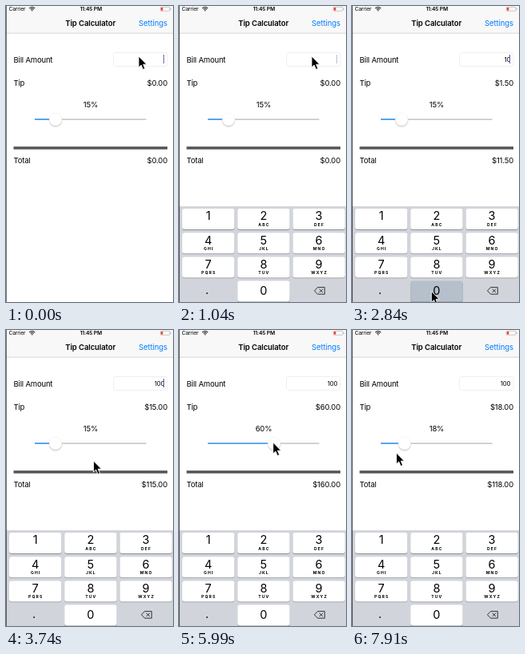
Write an HTML page that moves like this. It is 209 px wide and 371 px high and loops after 8 s.

```html
<!DOCTYPE html>
<html lang="en">
<head>
<meta charset="utf-8">
<title>Tip Calculator</title>
<style>
  html, body { margin: 0; width: 100%; height: 100%; overflow: hidden; background: #fff; }
  svg { display: block; width: 209px; height: 371px; font: 9.47px Inter, sans-serif; letter-spacing: -.017em; }
  .end { text-anchor: end; }
  .mid { text-anchor: middle; }
  .bold { font-weight: 600; }
  .title { letter-spacing: -.008em; }
  .status { font-size: 6.7px; }
  .digit { font-size: 14.5px; letter-spacing: 0; }
  .letters { font-size: 5.1px; font-weight: 700; letter-spacing: 1.1px; }
</style>
</head>
<body>
<svg viewBox="0 0 209 371">
  <rect width="209" height="34" fill="#f8f8f8"/>
  <path d="M0 34.2H209" stroke="#bcbcbe" stroke-width=".6"/>
  <text class="status" x="3.5" y="6.3">Carrier</text>
  <g fill="none" stroke="#000" stroke-width="1.1">
    <path d="M29.2 2.9a5 5 0 0 1 7 0M30.7 4.4a3 3 0 0 1 4 0"/>
    <circle cx="32.7" cy="5.7" r=".7" fill="#000" stroke="none"/>
  </g>
  <text class="status bold mid" x="106.3" y="6.3">11:45 PM</text>
  <rect x="193.2" y="1.3" width="11.8" height="5" rx="1" fill="none" stroke="#aaa" stroke-width=".6"/>
  <path d="M206 2.9v1.9" stroke="#aaa"/>
  <rect x="193.8" y="2" width="2.5" height="3.6" fill="#ff3b30"/>

  <text class="title bold mid" x="105.7" y="25">Tip Calculator</text>
  <text class="title end" x="202" y="25" fill="#007aff">Settings</text>
  <text x="9.5" y="71">Bill Amount</text>
  <text x="9.5" y="99.5">Tip</text>
  <text x="9.5" y="196.5">Total</text>
  <rect x="134.5" y="58.5" width="67.5" height="17" rx="3" fill="#fff" stroke="#ebebee" stroke-width=".8"/>
  <text id="bill" class="end" x="198.2" y="70" font-size="7.8"></text>
  <rect id="caret" x="197" y="61" width="1" height="11" fill="#5a55a8"/>
  <text id="tip" class="end" x="202" y="99.5"></text>
  <text id="percent" class="mid" x="106" y="127"></text>
  <text id="total" class="end" x="202" y="196.5"></text>

  <path d="M36 142.1H175.5" stroke="#b7b7b7" stroke-width="1.3"/>
  <path id="filled" stroke="#1e90ff" stroke-width="1.4"/>
  <g id="thumb">
    <circle cy="1.8" r="8.6" fill="#000" opacity=".06"/>
    <circle cy="1" r="8.3" fill="#000" opacity=".12"/>
    <circle r="8" fill="#fff" stroke="#e2e2e2" stroke-width=".3"/>
  </g>
  <rect x="9.5" y="176.2" width="192.5" height="3.5" fill="#555"/>

  <g id="keyboard">
    <rect y="251" width="209" height="120" fill="#d1d5db"/>
    <g id="keys"></g>
    <text class="digit mid" x="35" y="361">.</text>
    <path d="M173.5 352.6H182.3V361.2H173.5L169.5 356.9ZM175.6 354.7l4.4 4.4m0-4.4l-4.4 4.4"
      fill="none" stroke="#222" stroke-width=".9" stroke-linejoin="round"/>
  </g>
  <path d="M.5 0V371" stroke="#000" stroke-opacity=".55"/>
  <path id="pointer" d="M0 0V14L3.2 11.1 5.5 16.6 8 15.5 5.7 10.2H10Z" stroke="#fff" stroke-width=".9"/>
</svg>
<script>
const LOOP = 8000, STEP = 149.4; // the screen refreshes once per step
const GRAB = 32, RELEASE = 51;   // steps between which the slider is dragged
const TYPED = [14, 18, 21];      // steps at which a digit of the bill appears
const HOPS = [
  { from: 9, to: 12, x: 38, y: 263 },    // key 1
  { from: 14, to: 16, x: 99.3, y: 357.5 }, // key 0
  { from: 21, to: 25, x: 109.5, y: 164 },
  { from: 25, to: 29, x: 59, y: 136 }    // slider
];

const $ = id => document.getElementById(id);
const clamp = v => Math.min(1, Math.max(0, v));
const mix = (a, b, k) => a + (b - a) * k;
const wave = turns => Math.cos(2 * Math.PI * turns);

function ease(from, to, at) {
  const k = clamp((at - from) / (to - from));
  return k * k * (3 - 2 * k);
}

function key(label, letters, col, row) {
  const x = 4 + 69.2 * col, y = 254 + 30.2 * row, mid = x + 32.7;
  return `<rect x="${x}" y="${y + .9}" width="65.4" height="26" rx="3" fill="#8b8e94"/>
    <rect id="key${label}" x="${x}" y="${y}" width="65.4" height="26" rx="3" fill="#fff"/>
    <text class="digit mid" x="${mid}" y="${y + (row < 3 ? 14.3 : 17.7)}">${label}</text>
    <text class="letters mid" x="${mid + .5}" y="${y + 22}">${letters}</text>`;
}
const letters = ['', 'ABC', 'DEF', 'GHI', 'JKL', 'MNO', 'PQRS', 'TUV', 'WXYZ'];
$('keys').innerHTML = letters.map((s, n) => key(n + 1, s, n % 3, Math.floor(n / 3))).join('') + key(0, '', 1, 3);

// One swing to the right and back past the left end; below zero the thumb rests.
const swing = step => 24.3 + 65.4 * wave((Math.min(step, RELEASE) - 37) / 19.03);

function pointerAt(step) {
  if (step > GRAB) {
    const reach = swing(step), away = ease(RELEASE, RELEASE + 2, step);
    const x = 41.5 + reach * (reach > 0 ? 1.267 : .55);
    return [mix(x, 55.5, away), mix(141, 154, away)];
  }
  let x = 166, y = 63;
  for (const hop of HOPS) {
    const k = ease(hop.from, hop.to, step);
    x = mix(x, hop.x, k);
    y = mix(y, hop.y, k);
  }
  return [x, y];
}

function caretAlpha(step, count) {
  if (count && step < 23) return 1; // solid while typing
  const peak = count ? 550 : 750;
  return clamp(.9 + 1.6 * wave((step * 150 - peak) / 1000));
}

function draw(t) {
  const step = Math.floor((t + 10) / STEP);
  const count = TYPED.filter(s => step >= s).length;
  const bill = '100'.slice(0, count);
  const percent = step < GRAB ? 15 : Math.round(Math.max(0, swing(step)));
  const tip = bill * percent / 100;
  const thumbX = 43 + 1.267 * percent;
  const pressed = TYPED[count] - step <= 2 ? '100'[count] : '';

  $('bill').textContent = bill;
  $('percent').textContent = percent + '%';
  $('tip').textContent = '$' + tip.toFixed(2);
  $('total').textContent = '$' + (+bill + tip).toFixed(2);
  $('caret').setAttribute('opacity', caretAlpha(step, count));
  $('filled').setAttribute('d', `M36 142.1H${thumbX}`);
  $('thumb').setAttribute('transform', `translate(${thumbX} 142)`);
  $('keyboard').setAttribute('transform', `translate(0 ${121 * clamp(1 - step / 5) ** 3})`);
  $('pointer').setAttribute('transform', `translate(${pointerAt(step).join(' ')})`);
  for (const n of '01') $('key' + n).setAttribute('fill', pressed === n ? '#b5c0cc' : '#fff');
}

function tick() {
  draw(performance.now() % LOOP);
  requestAnimationFrame(tick);
}
tick();
</script>
</body>
</html>
```
